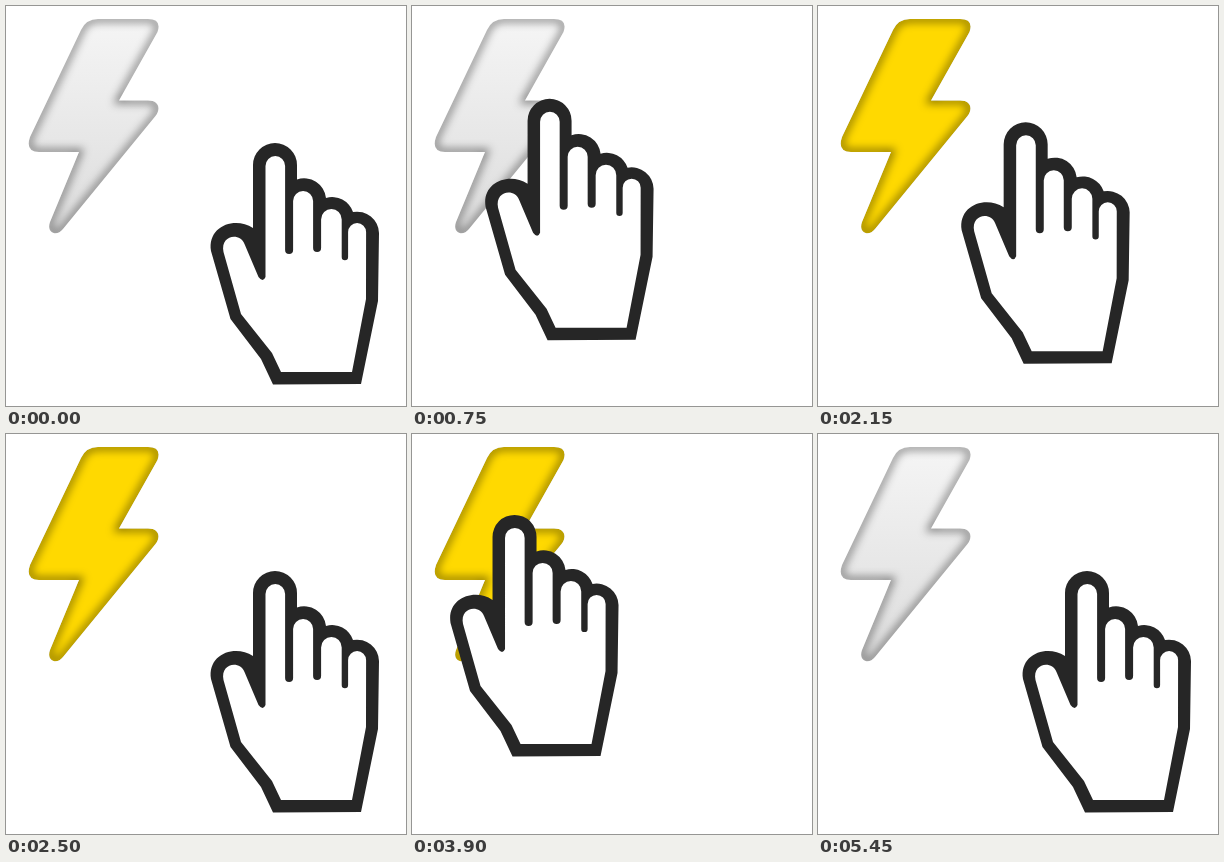
An HTML page that plays this animation: 400x400 px, repeating every 5900 ms.

```html
<!DOCTYPE html>
<html lang="en">
<head>
<meta charset="utf-8">
<title>Tap the bolt</title>
<style>
  html, body { margin: 0; width: 100%; height: 100%; overflow: hidden; background: #fff; }
  svg { display: block; width: 100%; height: 100%; }
</style>
</head>
<body>
<svg viewBox="0 0 400 400">
  <defs>
    <path id="bolt" d="M92 13H142Q156 13 151.500 26L113 94.500H142C153 94.500 155 103 149.500 110L57 223C51 231 40 227 44 216L73 146H33Q19 146 24 131L75 24Q80 13 92 13Z"/>
    <clipPath id="inside"><use href="#bolt"/></clipPath>
    <linearGradient id="silver" x2="0" y2="1">
      <stop stop-color="#f5f5f5"/>
      <stop offset="1" stop-color="#dcdcdc"/>
    </linearGradient>
    <filter id="soft" x="-20%" y="-20%" width="140%" height="140%">
      <feGaussianBlur stdDeviation="4.500"/>
    </filter>
  </defs>

  <g clip-path="url(#inside)">
    <use id="face" href="#bolt"/>
    <use href="#bolt" fill="none" stroke="#000" stroke-width="7" stroke-opacity=".42" filter="url(#soft)"/>
  </g>

  <g id="hand">
    <path fill="#262626" d="M247 222V159a22 22 0 0 1 44 0V173.500A22 22 0 0 1 320 192A22 22 0 0 1 347 206A22 22 0 0 1 373 227L372 295L355 378L267 378.500L255 353L224.500 313L205 245C201 220 229 210 247 222Z"/>
    <path fill="#fff" d="M275 366L266 347L235 308L217.500 246C214 229 234 226 238.500 238L252.500 271Q257 277 259.500 271V160a9.800 10 0 0 1 19.600 0V244a4 4 0 0 0 8 0V195a10 10 0 0 1 20 0V242a4 4 0 0 0 8 0V213.500a10.300 10.500 0 0 1 20.600 0V251a3.200 3.200 0 0 0 6.400 0V226a9 9 0 0 1 18 0L360 293L346 366Z"/>
  </g>
</svg>
<script>
  const TICK = 50, TAP = 2950, TRAVEL = 21;
  const face = document.getElementById('face');
  const hand = document.getElementById('hand');
  const progress = ticks => Math.min(1, Math.max(0, ticks / TRAVEL));

  function draw(now) {
    const time = now % (2 * TAP);
    const tick = Math.floor(time % TAP / TICK);
    const reach = progress(tick) - progress(tick - 29);
    const lit = time >= 1350 && time < 1350 + TAP;
    hand.setAttribute('transform', `translate(${-184 * reach} ${-62 * reach})`);
    face.setAttribute('fill', lit ? '#ffd900' : 'url(#silver)');
  }

  let start;
  function loop(now) {
    start ??= now;
    draw(now - start);
    requestAnimationFrame(loop);
  }
  draw(0);
  requestAnimationFrame(loop);
</script>
</body>
</html>
```
